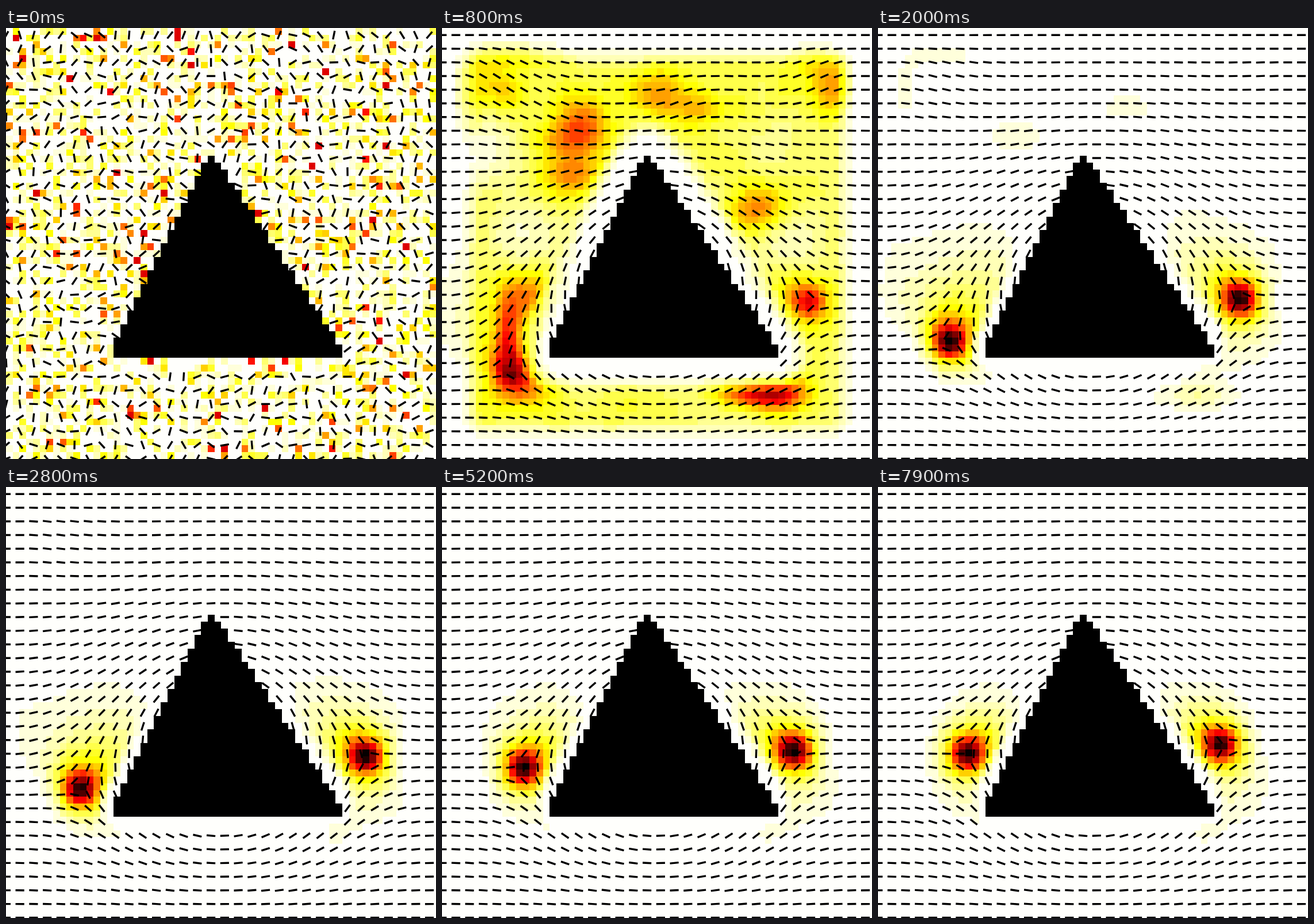
An HTML page with a canvas for the animation above (8 s loop, 748 px wide and 749 px high).

```html
<!DOCTYPE html>
<html lang="en">
<head>
<meta charset="utf-8">
<title>Nematic field around a triangle</title>
<style>
html, body { margin: 0; width: 100%; height: 100%; overflow: hidden; background: #fffffc; }
canvas { display: block; }
</style>
</head>
<body>
<canvas id="c" width="748" height="749"></canvas>
<script>
const N = 64, CELL = 11.7, GAP = 11.873, FRAMES = 80, STEP = 100;
const ctx = document.getElementById('c').getContext('2d');
const CENTRE = [374 / CELL, 445 / CELL];

// The two defects creep up towards the triangle
const leftAt = t => [(114 + 5.3 * t) / CELL, (587 - 60 * Math.log(Math.max(t, 0.9))) / CELL];
const rightAt = t => [(643 - 6 * t) / CELL, (478.5 - 3.9 * t) / CELL];

// Early twists of the field: x, y, radius, degrees, decay in seconds
const TWISTS = [[110, 105, 95, -45, 1.6], [215, 160, 50, -50, 0.4], [420, 140, 45, 88, 0.3], [645, 95, 60, 48, 0.7]];
// Centres of early dark and pale patches
const DARK = [[105, 110], [370, 110], [245, 155], [225, 260], [555, 310], [140, 465], [135, 625], [680, 110], [590, 640]];
const PALE = [[60, 200], [150, 360], [605, 395]];
// Bent walls that fade last: x, y, radii, strength
const WALLS = [[240, 188, 52, 28, 0.35], [437, 138, 44, 22, 0.34], [113, 535, 17, 55, 0.62], [552, 638, 52, 19, 0.92], [545, 320, 50, 32, 0.12]];

let seed = 71;
function rnd() {
  seed = (seed + 0x6D2B79F5) | 0;
  let t = Math.imul(seed ^ (seed >>> 15), 1 | seed);
  t = (t + Math.imul(t ^ (t >>> 7), 61 | t)) ^ t;
  return ((t ^ (t >>> 14)) >>> 0) / 4294967296;
}
const gauss = () => Math.sqrt(-2 * Math.log(1 - rnd())) * Math.cos(2 * Math.PI * rnd());
const clamp = (x, a = 0, b = 1) => Math.min(b, Math.max(a, x));
const smooth = (a, b, x) => { const u = clamp((x - a) / (b - a)); return u * u * (3 - 2 * u); };
const mix = (a, b, u) => a + (b - a) * u;
const wrap = a => Math.atan2(Math.sin(a), Math.cos(a));
const each = fn => { for (let y = 0, k = 0; y < N; y++) for (let x = 0; x < N; x++, k++) fn(x, y, k); };
const grid = fn => { const a = new Float64Array(N * N); each((x, y, k) => { a[k] = fn(x, y, k); }); return a; };
const at = (x, y) => clamp(y, 0, N - 1) * N + clamp(x, 0, N - 1);
const peak = a => a.reduce((m, v) => Math.max(m, v), 1e-9);

function blur(a) {
  return grid((x, y) => {
    let s = 0;
    for (let j = -1; j < 2; j++) for (let i = -1; i < 2; i++) s += a[at(x + i, y + j)];
    return s / 9;
  });
}
function blob(x, y, bx, by, rx, ry = rx) {
  const u = ((x + 0.5) * CELL - bx) / rx, v = ((y + 0.5) * CELL - by) / ry;
  return Math.exp(-(u * u + v * v) / 1.4);
}

function solid(x, y) {
  const d = y - 19;
  return d >= 0 && d < 30 && x >= Math.max(16, 30 - Math.ceil(d / 2)) && x < Math.min(50, 31 + Math.ceil(2 * d / 3));
}
const inside = grid((x, y) => solid(x, y) ? 1 : 0);
const body = [];
each((x, y, k) => { if (inside[k]) body.push([x, y]); });
const gapBody = grid((x, y) => Math.sqrt(body.reduce((m, [bx, by]) => Math.min(m, (x - bx) ** 2 + (y - by) ** 2), 1e9)));
const wallFade = u => smooth(1.5, 6, Math.min(u, N - 1 - u) + 0.5);
const edge = grid((x, y, k) => wallFade(x) * wallFade(y) * smooth(1.7, 6, gapBody[k]));

const spin = grid(() => rnd() * 2 * Math.PI);
let noiseC = spin.map(Math.cos), noiseS = spin.map(Math.sin);
let noiseV = grid(() => Math.min(0.7, 0.22 * Math.max(0, Math.abs(gauss()) - 0.55) ** 1.5));

let clouds = grid(gauss);
for (let n = 0; n < 6; n++) clouds = blur(clouds);
const cloudTop = peak(clouds);
const haze = grid((x, y, k) => {
  let v = 0.6 + 0.15 * clouds[k] / cloudTop;
  for (const p of DARK) v += 0.32 * blob(x, y, ...p, 40);
  for (const p of PALE) v -= 0.33 * blob(x, y, ...p, 55);
  return clamp(v, 0.2, 0.97) * edge[k];
});

// Angle of a cell seen from point p, y upward
const arg = (x, y, p) => Math.atan2(p[1] - y - 0.5, x + 0.5 - p[0]);

let psi = new Float64Array(N * N);
// Defects plus a harmonic part that meets the anchoring on walls and triangle
function angles(t, sweeps) {
  const l = leftAt(t), r = rightAt(t);
  const phi = grid((x, y) => {
    const c = arg(x, y, CENTRE);
    return (wrap(c - arg(x, y, l)) + wrap(c - arg(x, y, r))) / 2;
  });
  const free = [];
  each((x, y, k) => {
    if (x % (N - 1) === 0 || y % (N - 1) === 0) psi[k] = -phi[k];
    else if (inside[k]) psi[k] = (arg(x, y, l) + wrap(arg(x, y, r) + Math.PI)) / 2;
    else free.push(k);
  });
  for (let n = 0; n < sweeps; n++)
    for (const k of free) psi[k] += 1.8 * ((psi[k - 1] + psi[k + 1] + psi[k - N] + psi[k + N]) / 4 - psi[k]);
  return grid((x, y, k) => TWISTS.reduce((a, [bx, by, rad, deg, tau]) =>
    a + edge[k] * deg * Math.PI / 180 * Math.exp((0.4 - t) / tau) * blob(x, y, bx, by, rad), phi[k] + psi[k]));
}

// Loss of order from local bending, less a floor that is higher beside the triangle
function heat(theta, t) {
  const bend = (a, b) => (wrap(2 * (a - b)) / 2) ** 2;
  let v = blur(grid((x, y, k) => {
    if (inside[k]) return 0;
    const g = 7 * (bend(theta[k], theta[at(x + 1, y)]) + bend(theta[k], theta[at(x - 1, y)]) +
      bend(theta[k], theta[at(x, y + 1)]) + bend(theta[k], theta[at(x, y - 1)]));
    return g / (1 + g);
  }));
  v = v.map((s, k) => Math.max(0, s - 0.025 - 0.17 * Math.exp(-gapBody[k] / 3)) * smooth(0.8, 3.5, gapBody[k]));
  const top = peak(v), h = 1 - smooth(0.4, 1.15, t), fade = Math.exp(-Math.max(0, t - 1.2) / 0.33);
  return grid((x, y, k) => {
    let s = v[k] / top;
    for (const [bx, by, rx, ry, a] of WALLS) s += a * fade * edge[k] * blob(x, y, bx, by, rx, ry);
    return mix(clamp(s), haze[k] ** (3 - 2 * h), h);
  });
}

// The random start melts into the ordered field during the first frames
function build(i) {
  const t = Math.max(0.4, i * STEP / 1000), theta = angles(t, i ? 40 : 300);
  let v = heat(theta, t);
  const w = clamp(i / 4) ** 0.7;
  if (w < 1) {
    const top = i ? peak(noiseV) : 1;
    v = v.map((s, k) => mix(noiseV[k] / top * (i ? edge[k] : 1), s, w));
    each((x, y, k) => {
      const m = Math.hypot(noiseC[k], noiseS[k]) || 1;
      theta[k] = Math.atan2(mix(noiseS[k] / m, Math.sin(2 * theta[k]), w), mix(noiseC[k] / m, Math.cos(2 * theta[k]), w)) / 2;
    });
    for (let n = 0; n < 2; n++) [noiseC, noiseS, noiseV] = [noiseC, noiseS, noiseV].map(blur);
  }
  return { theta, v };
}
const frames = Array.from({ length: FRAMES }, (_, i) => build(i));

function colour(v) {
  const q = Math.round(v / 0.036) * 0.036;
  if (q <= 0) return '#fffffc';
  const x = 1 - q, ch = u => Math.round(255 * clamp(u));
  return `rgb(${ch(0.04 + x / 0.38)},${ch((x - 0.365) / 0.381)},${ch((x - 0.746) / 0.254)})`;
}
function fillCell(x, y) {
  const l = Math.round(x * CELL), t = Math.round(y * CELL);
  ctx.fillRect(l, t, Math.round((x + 1) * CELL) - l, Math.round((y + 1) * CELL) - t);
}
function draw({ theta, v }) {
  each((x, y, k) => { ctx.fillStyle = colour(v[k]); fillCell(x, y); });
  ctx.strokeStyle = ctx.fillStyle = '#000';
  ctx.lineWidth = 3.4;
  ctx.beginPath();
  for (let j = 0; j < N; j += 2) for (let x = 0; x < N; x += 2) {
    const y = N - 1 - j, k = y * N + x;
    if (inside[k] || solid(x, y - 1)) continue;
    const px = x * GAP + 0.4, py = 748.4 - j * GAP;
    const dx = 7.6 * Math.cos(theta[k]), dy = -7.6 * Math.sin(theta[k]);
    ctx.moveTo(px - dx, py - dy);
    ctx.lineTo(px + dx, py + dy);
  }
  ctx.stroke();
  for (const [x, y] of body) fillCell(x, y);
}

let shown = -1, start = null;
function tick(now) {
  if (start === null) start = now;
  const i = Math.floor(Math.max(0, now - start) / STEP) % FRAMES;
  if (i !== shown) draw(frames[shown = i]);
  requestAnimationFrame(tick);
}
draw(frames[0]);
requestAnimationFrame(tick);
</script>
</body>
</html>
```
